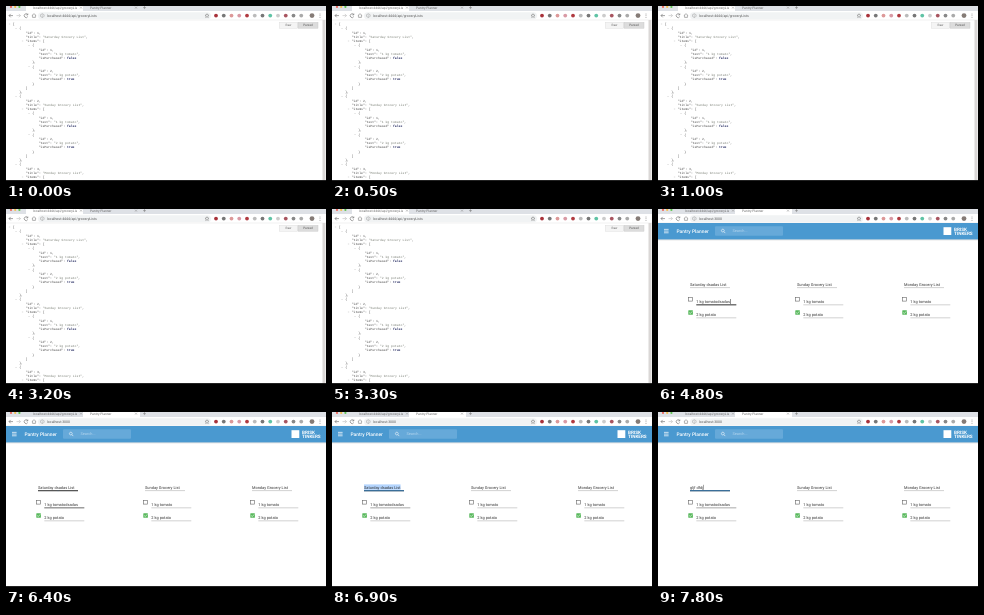
Animation, 320 px wide and 175 px high, one loop 8 s. Source, as an HTML page:

```html
<!DOCTYPE html>
<html lang="en">
<head>
<meta charset="utf-8">
<title>Grocery lists</title>
<style>
  html, body { margin: 0; width: 100%; height: 100%; overflow: hidden; background: #fff; }
  svg { display: block; width: 320px; height: 175px; }
  text { font-family: Roboto, sans-serif; text-rendering: geometricPrecision; white-space: pre; }
  .mono { font-family: "Liberation Mono", monospace; }
</style>
</head>
<body>
<svg id="stage" viewBox="0 0 320 175"></svg>
<script>
const LOOP = 8000;
const SWITCH = 4800;
const stage = document.getElementById('stage');

function add(parent, tag, attrs, content = '') {
  const el = document.createElementNS('http://www.w3.org/2000/svg', tag);
  for (const key in attrs) el.setAttribute(key, attrs[key]);
  el.textContent = content;
  parent.append(el);
  return el;
}
const group = parent => add(parent, 'g', {});
const rect = (p, x, y, width, height, fill, more) => add(p, 'rect', { x, y, width, height, fill, ...more });
const dot = (p, cx, cy, r, fill) => add(p, 'circle', { cx, cy, r, fill });
const line = (p, d, stroke, width = 0.6) => add(p, 'path', { d, stroke, 'stroke-width': width, fill: 'none' });
const label = (p, x, y, size, fill, content, more) =>
  add(p, 'text', { x, y, 'font-size': size, fill, ...more }, content);

function drawBrowser(page, activeTab, url) {
  rect(page, 0, 0, 320, 5, '#dee1e6');
  rect(page, activeTab ? 77 : 20, 0, 57, 5, '#fff');
  dot(page, 5, 1, 1.1, '#ed6a5e');
  dot(page, 9.2, 1, 1.1, '#f4bf4f');
  dot(page, 13.4, 1, 1.1, '#61c554');
  label(page, 27, 2.9, 3.3, '#666', 'localhost:4444/api/groceryLis');
  label(page, 84, 2.9, 3.3, '#666', 'Pantry Planner');
  for (const x of [74, 129]) line(page, `M${x} .6l2 2m0-2l-2 2`, '#777', 0.4);
  line(page, 'M137 1.6h3m-1.5-1.5v3', '#777', 0.5);

  rect(page, 0, 5, 320, 9, '#fff');
  rect(page, 32, 6.2, 173, 7, '#f1f3f4', { rx: 3.5 });
  line(page, 'M7 9.6h-4m1.7-1.7l-1.7 1.7l1.7 1.7', '#666');
  line(page, 'M10.5 9.6h4m-1.7-1.7l1.7 1.7l-1.7 1.7', '#bbb');
  line(page, 'M21.6 8.5a1.9 1.9 0 1 0 .2 2m0-3v1.4h-1.5', '#666');
  line(page, 'M25.8 9.6l2.2-1.9l2.2 1.9m-3.6-.4v2.2h2.8v-2.2', '#666', 0.5);
  line(page, 'M36.3 7.8a1.8 1.8 0 1 0 .01 0m0 .8v.3m0 .5v1.3', '#777', 0.4);
  label(page, 41, 10.8, 3.5, '#555', url);
  line(page, 'M201 7.7l.6 1.3l1.4.1l-1.1 1l.4 1.4l-1.3-.8l-1.3.8l.4-1.4l-1.1-1l1.4-.1z', '#777', 0.5);
  const icons = ['#a8323a', '#777', '#d99', '#d99aa5', '#b03a40', '#bbb', '#777', '#5fc3a5', '#ccc', '#a85560', '#888', '#aaa'];
  icons.forEach((color, i) => dot(page, 210 + i * 7.75, 9.6, 1.9, color));
  dot(page, 306, 9.6, 2.4, '#857b76');
  for (const y of [8, 9.6, 11.2]) dot(page, 314, y, 0.45, '#555');
  rect(page, 0, 13.8, 320, 0.4, '#ddd');
}

function drawJson(page) {
  let row = 0;
  const write = (depth, key, value, comma = '') => {
    const x = 6.7 + depth * 6.5, y = 19 + row++ * 4.25;
    const el = label(page, x, y, 3.15, '#444', '', { class: 'mono' });
    if (key) add(el, 'tspan', {}, `"${key}": `);
    const isFlag = /false|true/.test(value);
    const color = isFlag ? '#22285f' : value[0] === '"' ? '#777c72' : '#444';
    add(el, 'tspan', { fill: color, 'font-weight': isFlag ? 'bold' : 'normal' }, value);
    add(el, 'tspan', {}, comma);
    if (/[[{]/.test(value)) rect(page, x - 3.8, y - 1.2, 1.3, 0.4, '#aaa');
  };
  const writeItem = (id, text, done, comma) => {
    write(3, '', '{');
    write(4, 'id', id, ',');
    write(4, 'text', `"${text}"`, ',');
    write(4, 'isPurchased', done);
    write(3, '', '}', comma);
  };
  write(0, '', '[');
  ['Saturday', 'Sunday', 'Monday'].forEach((day, i) => {
    write(1, '', '{');
    write(2, 'id', `${i + 1}`, ',');
    write(2, 'title', `"${day} Grocery List"`, ',');
    write(2, 'items', '[');
    if (i === 2) return;
    writeItem('1', '1 kg tomato', 'false', ',');
    writeItem('2', '2 kg potato', 'true');
    write(2, '', ']');
    write(1, '', '}', ',');
  });
  rect(page, 273.5, 16.4, 18, 5.8, '#f4f4f4', { stroke: '#d8d8d8', 'stroke-width': 0.4 });
  rect(page, 292, 16.4, 20, 5.8, '#dcdcdc', { stroke: '#c4c4c4', 'stroke-width': 0.4 });
  label(page, 282.5, 20.4, 3.1, '#666', 'Raw', { 'text-anchor': 'middle' });
  label(page, 302, 20.4, 3.1, '#555', 'Parsed', { 'text-anchor': 'middle' });
  rect(page, 316.5, 14, 3, 160, '#dad7d6');
}

function drawHeader(page) {
  rect(page, 0, 30, 320, 1.4, '#000', { opacity: 0.12 });
  rect(page, 0, 14, 320, 16.4, '#4a99d0');
  for (const y of [20.2, 22, 23.8]) rect(page, 6, y - 0.3, 4.6, 0.7, '#fff');
  label(page, 18.5, 23.8, 4.9, '#fff', 'Pantry Planner', { 'font-weight': 500 });
  rect(page, 57, 17.3, 68, 9.4, '#66a9d9', { rx: 1 });
  line(page, 'M64.8 20.2a1.4 1.4 0 1 0 .01 0m1 2.4l1.5 1.5', '#fff');
  label(page, 74.5, 23.3, 3.9, '#b5d6ee', 'Search...');
  rect(page, 285.5, 18.2, 7.8, 7.8, '#fff');
  label(page, 296, 21.7, 4.6, '#fff', 'BRISK', { 'font-weight': 'bold' });
  label(page, 296, 26.3, 4.6, '#fff', 'TINKERS', { 'font-weight': 'bold' });
}

function drawList(page, x, title, first) {
  const field = (fx, y, content) => {
    rect(page, fx, y + 2, 40, 0.45, '#999');
    return label(page, fx, y, 3.95, '#333', content);
  };
  rect(page, x - 1.4, 88.3, 3.8, 3.8, '#fff', { stroke: '#666', 'stroke-width': 0.6 });
  rect(page, x - 1.7, 101.2, 4.6, 4.6, '#58b85c', { rx: 0.5 });
  line(page, `M${x - 0.8} 103.5l1.1 1.1l1.9-2.2`, '#fff', 0.6);
  const titleText = field(x, 76.6, title);
  const itemText = field(x + 6.3, 93.7, first);
  field(x + 6.3, 106.7, '2 kg potato');
  return [titleText, itemText];
}

const jsonPage = group(stage);
rect(jsonPage, 0, 0, 320, 175, '#fff');
drawBrowser(jsonPage, 0, 'localhost:4444/api/groceryLists');
drawJson(jsonPage);

const appPage = group(stage);
rect(appPage, 0, 0, 320, 175, '#fff');
drawBrowser(appPage, 1, 'localhost:3000');
drawHeader(appPage);
const selection = rect(appPage, 32, 72.4, 37, 5.4, '#b4d5fe');
const [titleText, itemText] = drawList(appPage, 32, 'Saturday dsadas List', '1 kg tomatodsadas');
drawList(appPage, 139, 'Sunday Grocery List', '1 kg tomato');
drawList(appPage, 246, 'Monday Grocery List', '1 kg tomato');
const itemLine = rect(appPage, 38.3, 95.4, 40, 0.9, '#333');
const hoverLine = rect(appPage, 32, 78.3, 40, 0.9, '#222');
const focusLine = rect(appPage, 32, 78.3, 40, 0.9, '#2f79b5');
const caret = rect(appPage, 0, 0, 0.5, 5, '#222');

rect(stage, 0, 174, 320, 1, '#222');

const ramp = (t, from, to) => Math.min(1, Math.max(0, (t - from) / (to - from)));
const show = (el, opacity) => el.setAttribute('opacity', opacity);

function typedTitle(t) {
  if (t < 7200) return 'Saturday dsadas List';
  const length = t < 7400 ? 1 : t < 7500 ? 2 : t < 7600 ? 3 : t < 7800 ? 4 : 9;
  return 'gljf dfdj'.slice(0, length);
}

function render(t) {
  show(appPage, t < SWITCH ? 0 : 1);
  if (t < SWITCH) return;
  titleText.textContent = typedTitle(t);

  show(itemLine, 1 - 0.75 * ramp(t, 6200, 6600));
  show(hoverLine, ramp(t, 6050, 6300));
  const grow = 1 - (1 - ramp(t, 6400, 6650)) ** 2;
  focusLine.setAttribute('x', 52 - 20 * grow);
  focusLine.setAttribute('width', 40 * grow);

  selection.setAttribute('width', titleText.getComputedTextLength());
  show(selection, t < 7200 ? ramp(t, 6750, 6900) : 0);

  const inItem = t < 6300;
  const target = inItem ? itemText : titleText;
  caret.setAttribute('x', (inItem ? 38.3 : 32) + target.getComputedTextLength() + 0.2);
  caret.setAttribute('y', inItem ? 90 : 72.8);
  const blink = 1 - ramp(t, 5050, 5200) + ramp(t, 5650, 5800) - ramp(t, 6100, 6250);
  show(caret, inItem ? blink : t < 6500 || (t >= 6800 && t < 7200) ? 0 : 0.8);
}

const start = performance.now();
function tick() {
  render((performance.now() - start) % LOOP);
  requestAnimationFrame(tick);
}
tick();
</script>
</body>
</html>
```
